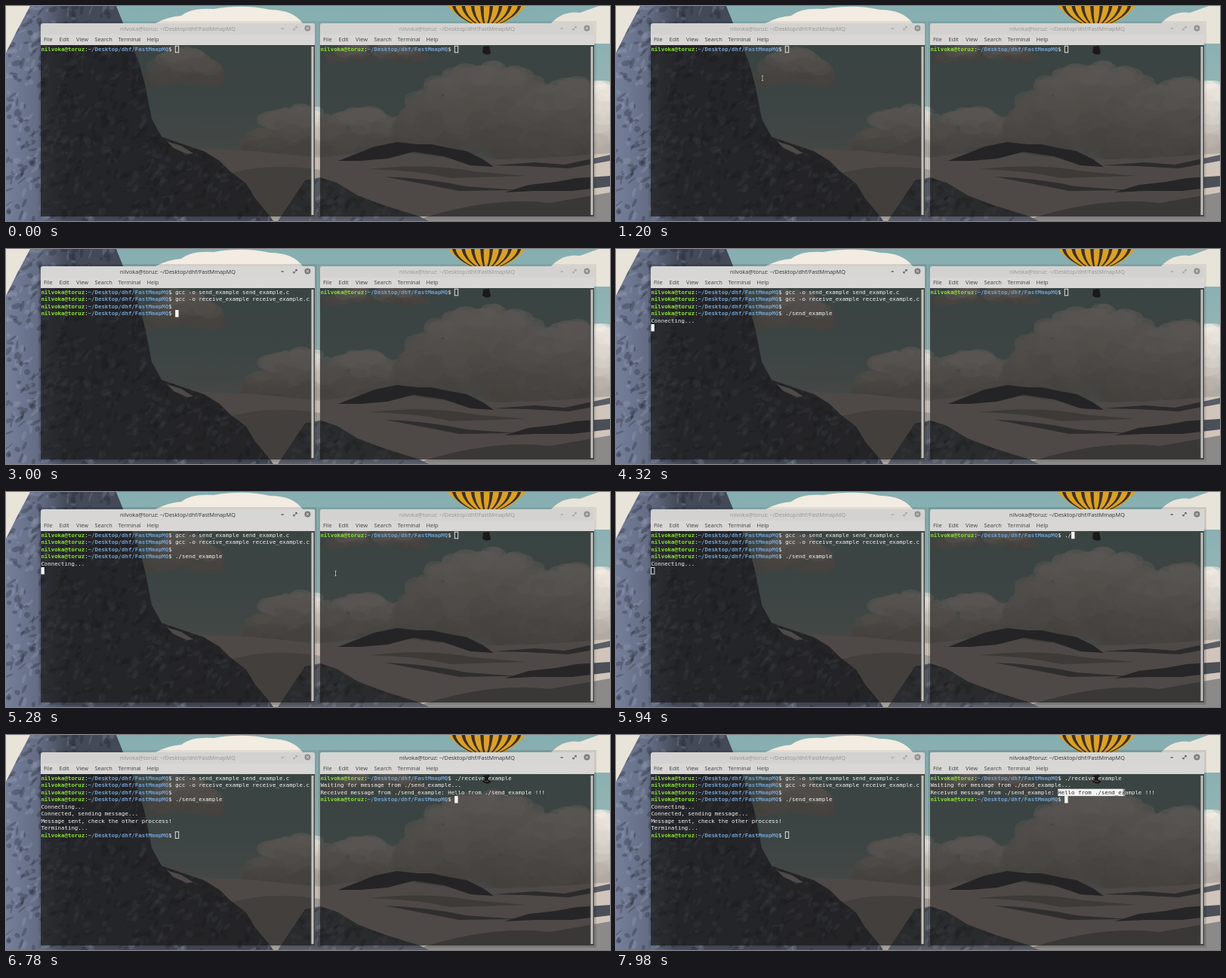
An HTML page with a canvas for the animation above (8000 ms loop, 800x286 px).

```html
<!DOCTYPE html>
<html lang="en">
<head>
<meta charset="utf-8">
<title>Two terminals</title>
<style>
html, body { margin: 0; width: 100%; height: 100%; overflow: hidden; }
canvas { display: block; }
</style>
</head>
<body>
<canvas id="stage" width="800" height="286"></canvas>
<script>
const LOOP = 8000, STEP = 60, ZOOM = 5 / 9;
const CELL_W = 8 * ZOOM, CELL_H = 17 * ZOOM;
const MONO = '"DejaVu Sans Mono", monospace', SANS = '"Open Sans", sans-serif';
const USER = 'nilvoka@toruz', DIR = '~/Desktop/dhf/FastMmapMQ';
const PROMPT_LEN = USER.length + DIR.length + 3;
const LEFT_FOCUS = 1380, RIGHT_FOCUS = 5640, DRAG_START = 7740;

// Each entry: start time, output, optional typing duration. "$" is a prompt.
const leftLog = [
  [0, '$'],
  [2040, 'gcc -o send_example send_example.c\n'],
  [2280, '$gcc -o receive_example receive_example.c\n'],
  [2520, '$'],
  [2820, '\n$'],
  [3000, './sen', 300],
  [3420, 'd_example', 480],
  [4200, '\nConnecting...\n'],
  [6480, 'Connected, sending message...\n'],
  [6540, 'Message sent, check the other proccess!\n'],
  [6600, 'Terminating...\n$']
];
const rightLog = [
  [0, '$'],
  [5880, './'],
  [5940, 'receive_example', 300],
  [6420, '\nWaiting for message from ./send_example...\n'],
  [6540, 'Received message from ./send_example: Hello from ./send_example !!!\n$']
];
const blinkOff = [[1680, 1860], [4680, 4920], [7200, 7380]];
// start, end, hide time, from x, y, to x, y
const mousePath = [
  [780, 1200, 2040, 230, 208, 194, 96],
  [5100, 5580, 5880, 194, 96, 592, 116],
  [7560, DRAG_START, DRAG_START, 592, 116, 585, 76],
  [DRAG_START, 7980, LOOP, 585, 76, 673, 76]
];

const stage = document.getElementById('stage');
let g = stage.getContext('2d');

function shape(color, path) {
  g.fillStyle = color;
  g.fill(new Path2D(path));
}

function rect(color, x, y, w, h) {
  g.fillStyle = color;
  g.fillRect(x, y, w, h);
}

function line(color, width, path) {
  g.strokeStyle = color;
  g.lineWidth = width;
  g.stroke(new Path2D(path));
}

function blob(color, x, y, rx, ry, turn = 0) {
  g.fillStyle = color;
  g.beginPath();
  g.ellipse(x, y, rx, ry, turn, 0, 7);
  g.fill();
}

function text(str, x, y, font, color, align = 'left') {
  g.save();
  g.translate(x, y);
  g.scale(ZOOM, ZOOM);
  g.font = font;
  g.fillStyle = color;
  g.textAlign = align;
  g.fillText(str, 0, 0);
  g.restore();
}

function makeRandom(seed) {
  return () => (seed = (seed * 16807) % 2147483647) / 2147483647;
}

// Puffs fill a dome, lit at the top and shaded towards the base.
function cloud(random, x, y, w, h) {
  const count = 14 + w * h / 55;
  for (let i = 0; i < count; i++) {
    const u = random(), dome = Math.sqrt(4 * u * (1 - u));
    const v = 1 - dome * random();
    const r = 3 + random() * Math.min(9, h * 0.2);
    const shade = 238 - 75 * v + random() * 15;
    blob(`rgba(${shade + 3},${shade - 4},${shade - 12},.6)`, x + u * w, y + r + v * (h - r), r * 1.6, r);
  }
}

// Uneven surface of light and dark flecks inside a path.
function mottle(random, path, x, y, w, h, count) {
  g.save();
  g.clip(path);
  for (let i = 0; i < count; i++) {
    const color = random() < 0.55 ? 'rgba(30,34,46,.28)' : 'rgba(170,178,200,.2)';
    blob(color, x + random() * w, y + random() * h, 1 + random() * 3, 2 + random() * 6, random() * 1.5);
  }
  g.restore();
}

function drawBalloon() {
  shape('#dba126', 'M585 0Q597 14 616 24H657Q676 15 688 0Z');
  for (let i = 0; i < 8; i++) {
    const top = 591 + i * 12.4, bottom = 618 + i * 4.8;
    const bend = (top + bottom) / 2 + (i - 3.5) * 3;
    shape('#3d3024', `M${top} 0Q${bend} 13 ${bottom} 24h1.8Q${bend + 3.5} 13 ${top + 4.5} 0Z`);
  }
  shape('#2a2421', 'M632 54L640 53L642 63Q637 67 631 62Z');
}

function drawScene() {
  const random = makeRandom(71);
  const sky = g.createLinearGradient(0, 0, 0, 210);
  sky.addColorStop(0, '#86aeb0');
  sky.addColorStop(0.65, '#96b5b5');
  sky.addColorStop(1, '#b4bfbb');
  rect(sky, 0, 0, 800, 286);

  shape('#f2ece2', 'M198 23Q215 14 232 13Q245 2 275 4Q315 -3 350 5Q380 5 393 23Z');
  shape('#e9e4da', 'M0 0H34L0 70ZM722 23Q738 6 760 9L785 0H800V50H760Z');
  cloud(random, 192, 50, 85, 48);
  cloud(random, 322, 128, 125, 66);
  cloud(random, 425, 48, 130, 22);
  cloud(random, 400, 132, 150, 60);
  cloud(random, 520, 72, 230, 122);
  cloud(random, 660, 92, 190, 104);

  // snow fields and far ridges
  shape('#d1c5bb', 'M200 184L260 190L330 193L416 202L500 190L600 205L700 203L800 196V286H200Z');
  shape('#a9a39e', 'M300 222Q350 208 416 218V286H320Z');
  shape('#454851', 'M440 206L473 193L488 187L518 181L545 184L564 184L587 189L610 193L632 204L646 214L615 212L580 200L540 194L505 203L470 206Z');
  shape('#97918b', 'M480 217Q560 208 620 220L690 226L590 229Q540 218 480 217Z');
  shape('#686a6e', 'M500 227Q560 229 610 240L680 245L600 246Q540 234 500 227Z');
  shape('#5a5d65', 'M645 212L700 208L740 211L800 198V206L745 216L690 213Z');
  shape('#8c8a88', 'M540 286Q640 252 720 262L800 248V286Z');
  shape('#4b4f58', 'M660 248L692 238L728 234L755 229L800 226V240L750 246L700 246Z');
  const foothills = new Path2D('M384 250L396 232L416 228L438 235L466 252L500 265L548 280L560 286H360Z');
  g.fillStyle = '#585d68';
  g.fill(foothills);
  mottle(random, foothills, 370, 225, 190, 61, 130);

  const cliff = new Path2D('M32 0H146L156 25L168 55L177 78L185 108L193 150L206 174L232 183L262 193L283 206L297 220L318 236L330 256L350 280L354 286H0V62L16 30Z');
  const rock = g.createLinearGradient(0, 0, 230, 0);
  rock.addColorStop(0, '#767f9a');
  rock.addColorStop(0.2, '#626b82');
  rock.addColorStop(0.35, '#444a58');
  rock.addColorStop(1, '#424855');
  g.fillStyle = rock;
  g.fill(cliff);
  mottle(random, cliff, 0, 0, 354, 286, 1100);
  shape('#cfc8c0', 'M213 180L232 186L248 196L240 197L222 189Z');
  drawBalloon();
}

function drawButtons(x, color, ring) {
  line(color, 1, `M${x + 318.5} 30h3.4`);
  line(color, 0.8, `M${x + 335.3} 31.5l3.6 -3.8M${x + 337.2} 27.5h2v2M${x + 334.8} 29.8v2h2`);
  blob(ring, x + 353.4, 29.5, 4, 4);
  line('#e4e4e2', 1, `M${x + 351.9} 28l3 3m0 -3l-3 3`);
}

function drawFrame(x, focused) {
  for (let i = 1; i < 4; i++) {
    g.strokeStyle = `rgba(0,0,0,${focused ? 0.12 : 0.07})`;
    g.lineWidth = 1;
    g.strokeRect(x - i + 0.5, 23.5 - i, 362 + i * 2, 256 + i * 2);
  }
  rect('rgba(24,22,20,.7)', x, 52, 363, 228);
  g.fillStyle = focused ? '#d6d6d5' : '#d3d2d0';
  g.beginPath();
  g.roundRect(x, 23, 363, 29, [3, 3, 0, 0]);
  g.fill();
  rect('#d8d7d5', x, 38, 363, 14);
  const ink = focused ? '#333' : '#959692';
  text(`${USER}: ${DIR}`, x + 181.5, 33, `500 13.2px ${SANS}`, ink, 'center');
  drawButtons(x, ink, focused ? '#7c7c7a' : '#8f8f8d');
  ['File', 'Edit', 'View', 'Search', 'Terminal', 'Help'].forEach((name, i) => {
    text(name, x + [4, 24.5, 47, 71.5, 102.5, 140.5][i], 47.4, `13.4px ${SANS}`, '#404040');
  });
  rect('rgba(70,70,68,.8)', x + 357.5, 52, 5.5, 228);
  rect('#c3c2bf', x + 358.5, 54, 3, 224);
}

function textAt(log, t) {
  return log.map(([start, str, duration]) => {
    if (t < start) return '';
    return duration ? str.slice(0, Math.floor((t - start) / duration * str.length + 1e-6)) : str;
  }).join('');
}

function drawTerminal(x, log, t, focused) {
  drawFrame(x, focused);
  const left = x + 0.4, top = 52.8;
  const put = (str, col, row, color, weight = '') =>
    text(str, left + col * CELL_W, top + row * CELL_H + 7.2, `${weight} 13.29px ${MONO}`, color);
  const lines = textAt(log, t).split('\n');
  let col = 0;
  lines.forEach((str, row) => {
    col = 0;
    if (str[0] === '$') {
      put(USER, 0, row, '#8ae234', 'bold');
      put(':', USER.length, row, '#eee');
      put(DIR, USER.length + 1, row, '#729fcf', 'bold');
      put('$', PROMPT_LEN - 2, row, '#eee');
      str = str.slice(1);
      col = PROMPT_LEN;
    }
    put(str, col, row, '#f0f0ee');
    col += str.length;
  });
  const cx = left + col * CELL_W, cy = top + (lines.length - 1) * CELL_H;
  if (!focused) {
    g.strokeStyle = '#eee';
    g.lineWidth = 0.9;
    g.strokeRect(cx + 0.1, cy + 0.4, CELL_W, CELL_H - 0.8);
  } else if (!blinkOff.some(([from, to]) => t >= from && t < to)) {
    rect('#f4f4f2', cx, cy, CELL_W, CELL_H);
  }
  return { left, top, put };
}

function mouseAt(t) {
  const leg = mousePath.find(([start, , hide]) => t >= start && t < hide);
  if (!leg) return null;
  const [start, end, , x0, y0, x1, y1] = leg;
  const p = Math.min(1, (t - start) / (end - start));
  const ease = p * (2 - p);
  return { x: x0 + (x1 - x0) * ease, y: y0 + (y1 - y0) * ease };
}

function drawSelection(term, mouse) {
  const first = 'Received message from ./send_example: '.length;
  const x = term.left + first * CELL_W;
  const count = Math.max(0, Math.round((mouse.x - x) / CELL_W));
  rect('#f4f4f2', x, term.top + 2 * CELL_H, count * CELL_W, CELL_H);
  term.put('Hello from ./send_example !!!'.slice(0, count), first, 2, '#2b2b2a');
}

function drawMouse({ x, y }) {
  const beam = `M${x - 1.3} ${y - 3.2}h2.6M${x} ${y - 3.2}v6.4M${x - 1.3} ${y + 3.2}h2.6`;
  line('#1a1a1a', 1.9, beam);
  line('#e8e8e8', 0.8, beam);
}

const scene = document.createElement('canvas');
scene.width = 800;
scene.height = 286;
const screen = g;
g = scene.getContext('2d');
drawScene();
g = screen;

function draw(now) {
  const t = Math.floor(now % LOOP / STEP) * STEP;
  g.drawImage(scene, 0, 0);
  drawTerminal(46, leftLog, t, t >= LEFT_FOCUS && t < RIGHT_FOCUS);
  const right = drawTerminal(416, rightLog, t, t >= RIGHT_FOCUS);
  const mouse = mouseAt(t);
  if (mouse) {
    if (t >= DRAG_START) drawSelection(right, mouse);
    drawMouse(mouse);
  }
  requestAnimationFrame(draw);
}
requestAnimationFrame(draw);
</script>
</body>
</html>
```
